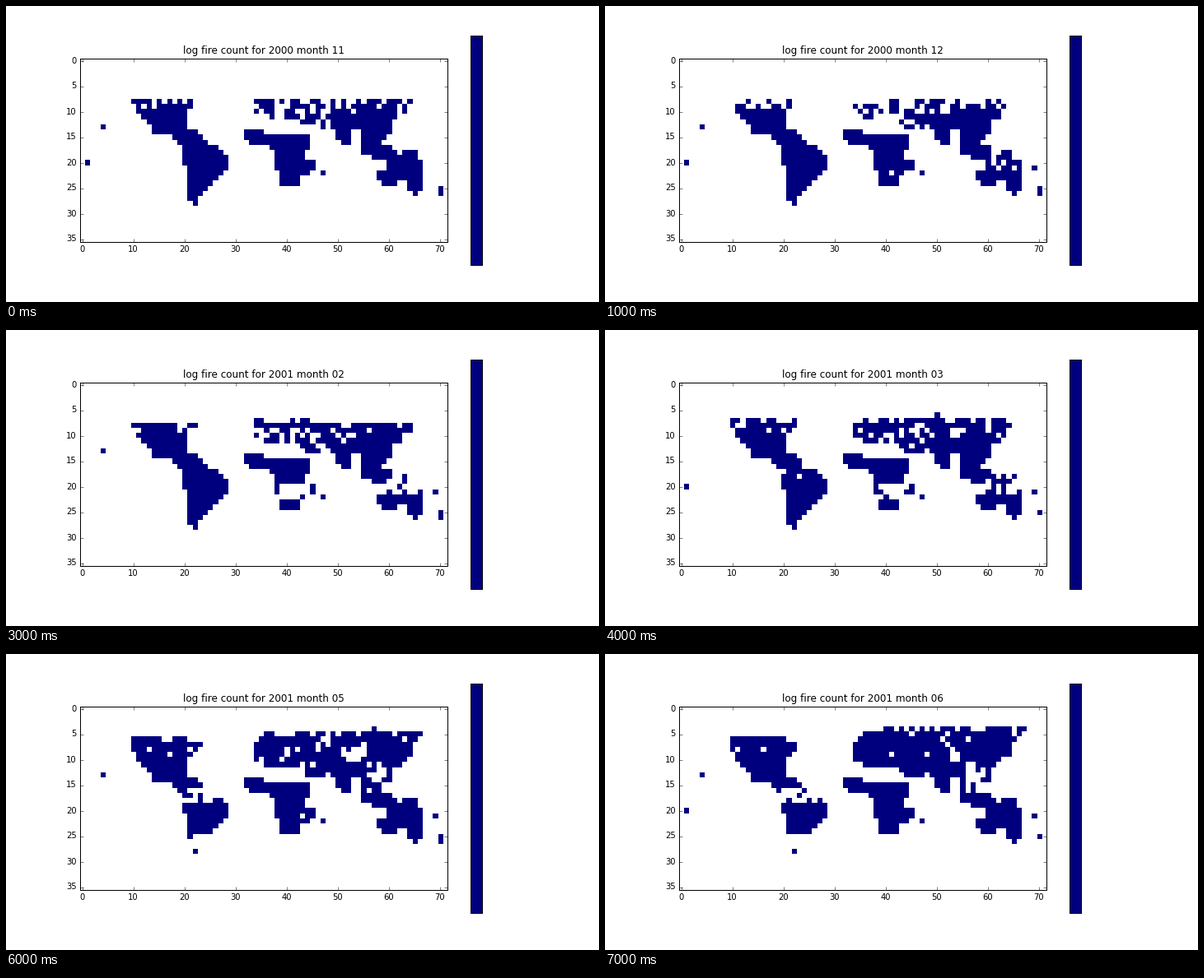
Write a matplotlib script that moves like this. It is 720 px wide and 360 px high and loops after 8 s.

```python
import numpy as np
import matplotlib.pyplot as plt
from matplotlib.animation import FuncAnimation
from matplotlib.colors import ListedColormap
from matplotlib.path import Path
from matplotlib.transforms import Affine2D

plt.style.use("classic")
plt.rcParams.update({
    "font.size": 10, "font.family": "DejaVu Sans", "figure.dpi": 72,
    "savefig.dpi": 72, "figure.facecolor": "white",
    "savefig.facecolor": "white",
})

ROWS, COLS = 36, 72
MONTHS = 8
NAVY = "#00007f"

# Cell centres in grid units
X, Y = np.meshgrid(np.arange(COLS) + 0.5, np.arange(ROWS) + 0.5)

# Coasts of land that burns all year
NORTH_AMERICA = [(11, 10), (21, 10), (21, 14), (23, 14), (25, 17), (20.2, 17),
                 (17, 15), (14, 15), (13.8, 13)]
SOUTH_AMERICA = [(20, 16), (24.2, 16), (29, 19), (29, 22), (28.2, 22),
                 (23.2, 27), (23, 29), (22, 29), (21, 27), (21, 21), (20, 21)]
AFRICA = [(32, 14), (36, 14), (36, 15), (45, 15), (45, 18), (44, 18),
          (44, 20), (46, 20), (46, 22), (42.4, 24), (43, 25), (39, 25),
          (38, 19), (37, 17), (34, 17), (32, 16)]
ASIA = [(49, 11), (53, 12), (55, 10), (61, 10), (61, 14), (59, 17), (62, 18),
        (62, 19), (61, 20), (57, 20), (57, 19), (55, 19), (55, 14), (53, 14),
        (53, 17), (51, 17), (50, 14), (49, 14)]
OCEANIA = [(60, 19), (66, 18), (67, 22), (67, 25), (66, 27), (65, 27),
           (64, 24), (62, 24), (62, 25), (59, 25), (58, 22), (60, 22)]

# Northern land that burns only south of the snow line
CANADA = [(10, 6), (17, 6), (24, 7), (21, 11), (11, 11), (11, 9), (10, 8)]
EURASIA = [(34, 9), (35, 6), (38, 5), (41, 4), (68, 4), (65, 7), (65, 10),
           (62, 12), (49, 12), (47, 14), (45, 14), (43, 12), (38, 12),
           (34, 11)]

ISLANDS = [(1, 20), (4, 13), (47, 22), (69, 21), (70, 25), (70, 26)]

# Rainy areas: centre, radii and the month, from the start, of most rain
RAIN = [(23, 17.8, 5, 1.6, 6.5), (24, 26.5, 4, 1.7, 6.5),
        (42, 21.3, 3.5, 1.8, 3.5), (63.5, 20, 4, 1.8, 2.5),
        (58, 14, 2.3, 3.5, 7.5), (53.5, 9.5, 2.5, 1.5, 5.5)]


def season(month, peak):
    return np.cos(2 * np.pi * (month - peak) / 12)


def inside(*outlines):
    centres = np.column_stack([X.ravel(), Y.ravel()])
    hits = [Path(o + o[:1]).contains_points(centres) for o in outlines]
    return np.any(hits, axis=0).reshape(X.shape)


south = inside(NORTH_AMERICA, SOUTH_AMERICA, AFRICA, ASIA, OCEANIA)
north = inside(CANADA, EURASIA)


def fires(month):
    rng = np.random.default_rng(month)
    noise, drops = rng.random((2, ROWS, COLS))

    winter = season(month, 1.4)
    snow_line = 6.7 + 2.2 * winter
    chance = np.clip(0.5 + 0.6 * (Y - snow_line), 0, 0.82 - 0.13 * winter)
    grid = south | (north & (noise < chance))

    for cx, cy, rx, ry, peak in RAIN:
        wet = max(0, season(month, peak)) ** 2
        area = ((X - cx) / rx) ** 2 + ((Y - cy) / ry) ** 2 < 1
        grid &= ~(area & (drops < 0.85 * wet))

    for c, r in ISLANDS:
        grid[r, c] = noise[r, c] < 0.85
    return np.ma.masked_equal(grid.astype(float), 0)


maps = [fires(m) for m in range(MONTHS)]

fig = plt.figure(figsize=(10, 5), dpi=72)
ax = fig.add_axes([90 / 720, 72.9 / 360, 446.4 / 720, 223.2 / 360])
image = ax.imshow(maps[0], cmap=ListedColormap([NAVY]), vmin=0, vmax=1,
                  interpolation="nearest", aspect="auto", origin="upper")
ax.set_xlim(-0.5, COLS - 0.5)
ax.set_ylim(ROWS - 0.5, -0.5)
ax.set_xticks(range(0, COLS, 10))
ax.set_yticks(range(0, ROWS, 5))
title = ax.set_title("", y=1, pad=5)

# Half a pixel left and up makes text positions round down
nudge = Affine2D().translate(-0.5, 0.5)
for label in [title, *ax.get_xticklabels(), *ax.get_yticklabels()]:
    label.set_transform(label.get_transform() + nudge)

bar = fig.add_axes([564.3 / 720, 45 / 360, 13.95 / 720, 279 / 360],
                   facecolor=NAVY)
bar.set_xticks([])
bar.set_yticks([])


def update(i):
    year, month = divmod(10 + i, 12)
    image.set_data(maps[i])
    title.set_text(f"log fire count for {2000 + year} month {month + 1:02d}")
    return image, title


anim = FuncAnimation(fig, update, frames=MONTHS, interval=1000,
                     repeat=True, repeat_delay=0, blit=False)
plt.show()
```
